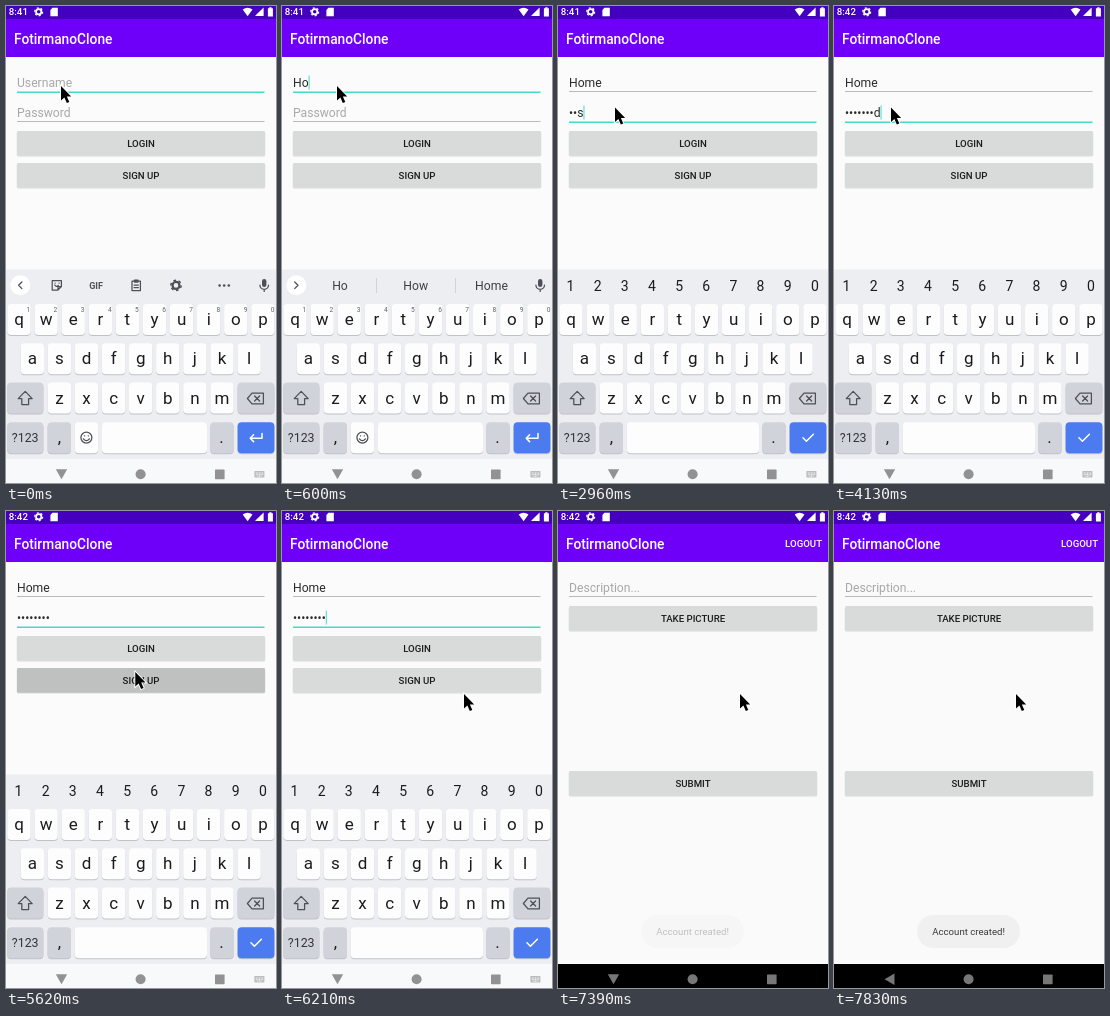
Animation, 270 px wide and 477 px high, one loop 8000 ms. Source, as an HTML page:

```html
<!DOCTYPE html>
<html lang="en">
<head>
<meta charset="utf-8">
<title>Sign up</title>
<style>
  html, body { margin: 0; width: 100%; height: 100%; overflow: hidden; background: #fbfbfb; }
  svg { display: block; width: 270px; height: 477px; font-family: Roboto, sans-serif; }
  .mid { text-anchor: middle; }
  .bold { font-weight: 500; }
  .line { fill: none; stroke: #4d5056; stroke-width: 1.25; stroke-linejoin: round; stroke-linecap: round; }
</style>
</head>
<body>
<svg id="stage" viewBox="0 0 270 477"></svg>
<script>
const LOOP = 8000;
const TEAL = '#45dac8', BAR = '#6e00f9', KEY = '#fdfdfe', GREY = '#d1d3da', INK = '#1a1b1d';
const FIELD = 12.15;

const rect = (x, y, w, h, fill, r = 0, more = '') =>
  `<rect x="${x}" y="${y}" width="${w}" height="${h}" rx="${r}" fill="${fill}" ${more}/>`;
const text = (x, y, size, fill, str, cls = '', more = '') =>
  `<text x="${x}" y="${y}" font-size="${size}" fill="${fill}" class="${cls}" ${more}>${str}</text>`;
const path = (d, more = 'class="line"') => `<path d="${d}" ${more}/>`;
const disc = (x, y, r, fill, more = '') => `<circle cx="${x}" cy="${y}" r="${r}" fill="${fill}" ${more}/>`;
const group = (id, body) => `<g id="${id}">${body}</g>`;

const gear = (x, y, r, color) =>
  disc(x, y, r * .58, 'none', `stroke="${color}" stroke-width="${r * .38}"`) +
  disc(x, y, r * .86, 'none', `stroke="${color}" stroke-width="${r * .26}" pathLength="12" stroke-dasharray="1 1"`);

const button = (y, label, id = '') =>
  rect(10.6, y + .7, 248.8, 25.1, '#000', 1.8, 'opacity=".09"') +
  rect(11, y, 248, 24.8, '#d9dada', 1.4) +
  (id ? rect(11, y, 248, 24.8, '#bfc0c0', 1.4, `id="${id}" opacity="0"`) : '') +
  text(135, y + 16, 9.63, INK, label, 'mid bold');

const underline = (id, y) => `<line id="${id}" x1="11" x2="258.5" y1="${y}" y2="${y}" stroke="#aaa" stroke-width=".8"/>`;
const hint = (id, y, str) => text(11, y, FIELD, '#a8a8a8', str, '', `id="${id}"`);
const appBar = rect(0, 13, 270, 38, BAR) + text(8, 37.7, 13.75, '#fff', 'FotirmanoClone', 'bold');

function statusBar() {
  const w = 'fill="#fff"';
  return rect(0, 0, 270, 13, '#4500bf') +
    text(2.8, 9.4, 9.7, '#fff', '8:41', 'bold', 'id="clock"') +
    gear(32.7, 5.8, 4.6, '#fff') +
    path('M46.4 1.8h5.4v8.4h-7.4v-6.2z', w) +
    path('M241.6 10.2L236.7 3.6Q241.6 -.2 246.5 3.6Z', w) +
    path('M249.4 10V9.6L257.6 1.6V10Z', w) +
    path('M261.9 2.2h1.4v-1h2.2v1h1.4v8.2h-5z', w);
}

function login() {
  return appBar + hint('userHint', 81, 'Username') + text(11, 81, FIELD, '#2b2b2b', '', '', 'id="user"') +
    hint('passHint', 111, 'Password') + text(11, 111, FIELD, '#2b2b2b', '', '', 'id="pass"') +
    underline('userLine', 85.5) + underline('passLine', 115.5) +
    button(125, 'LOGIN') + button(157, 'SIGN UP', 'press') +
    rect(0, 0, 1, 14, TEAL, 0, 'id="caret"');
}

function home() {
  return rect(0, 13, 270, 440, '#fafafa') + appBar +
    text(264, 36.2, 9.63, '#fff', 'LOGOUT', 'bold', 'text-anchor="end"') +
    hint('about', 81, 'Description...') + underline('aboutLine', 85.5) +
    button(95, 'TAKE PICTURE') + button(260, 'SUBMIT');
}

const key = (x, y, w, fill = KEY) =>
  rect(x, y + 1, w, 31, '#bfc2ca', 4) + rect(x, y, w, 31, fill, 4);

function letters() {
  const rows = [['qwertyuiop', 13, 298], ['asdfghjkl', 26.3, 337.2], ['zxcvbnm', 53.4, 376.6]];
  return rows.map(([row, x0, y]) => [...row].map((c, i) => {
    const x = x0 + 27.1 * i;
    return key(x - 11.7, y, 23.4) + text(x, y + 21, 17, INK, c, 'mid letter');
  }).join('')).join('');
}

const digits = (dx, y, size, fill) => [...'1234567890'].map((d, i) =>
  text(12.5 + dx + 27.15 * i, y, size, fill, d, 'mid')).join('');

const mic = rect(256, 273, 4.4, 8, '#4d5056', 2.2) + path('M253.9 279a4.3 4.3 0 0 0 8.6 0M258.2 283.4v2');
const chevron = dir => disc(14.3, 279.3, 10, '#fff') + path(`M${14.3 - 1.6 * dir} 276l${3.3 * dir} 3.3l${-3.3 * dir} 3.3`);

function keyboard() {
  const tools = chevron(-1) +
    path('M46.2 274.5h9.2v6l-3.5 3.5h-5.7zM52 284v-3.5h3.5M48.8 279q1.6 2.5 3.5 .5M49 277h.2M53 277h.2') +
    text(90, 282.7, 9, '#4d5056', 'GIF', 'mid', 'font-weight="700"') +
    path('M126 275h8.4v9.6h-8.4zM128.4 274h3.6v2h-3.6zM128 279h4.4M128 281.6h4.4') +
    gear(170, 279.4, 6, '#4d5056') +
    [213.6, 218.2, 222.8].map(x => disc(x, 279.5, 1.3, '#4d5056')).join('') + mic;
  const words = chevron(1) + rect(94, 272, .7, 15, '#c6c8ce') + rect(173.2, 272, .7, 15, '#c6c8ce') +
    [58, 133.7, 209.5].map(x => text(x, 284, 12.2, '#3c4043', '', 'mid word')).join('') + mic;
  const white = 'class="line" style="stroke:#fff;stroke-width:1.5"';
  const plain = key(96, 416.2, 105) + key(68.7, 416.2, 23.4) +
    disc(80.4, 431.6, 5.5, 'none', 'class="line"') + path('M77.4 432.8q3 3.8 6 0M78.4 429.8h.2M82.2 429.8h.2') +
    path('M256 427.6v4.6h-11.8m3.4 -3.4l-3.4 3.4l3.4 3.4', white) + digits(9.8, 306.2, 6.6, '#5f6368');
  const secret = key(68.7, 416.2, 132.3) + path('M245 431.8l3.4 3.4l7 -7', white) + digits(0, 284.8, 14, INK);
  return rect(0, 263.5, 270, 189.5, '#eceef2') + rect(0, 453, 270, 24, '#f8f9fa') +
    group('tools', tools) + group('words', words) + letters() +
    key(1.2, 376.6, 36.2, GREY) + path('M19.2 385.4l7 7.2h-3.6v6h-6.8v-6h-3.6z', 'class="line" id="shift"') +
    key(231.6, 376.6, 36.8, GREY) + path('M246 387.2h11.4v10.6h-11.4l-4.6 -5.3zM248.6 390l5 5m0 -5l-5 5') +
    key(1.2, 416.2, 36.2, GREY) + text(19.2, 436.2, 12.4, '#303338', '?123', 'mid') +
    key(41.6, 416.2, 23.4, GREY) + text(53.5, 437.4, 17, INK, ',', 'mid') +
    key(204.3, 416.2, 23.4, GREY) + text(215.6, 437.4, 17, INK, '.', 'mid') +
    key(231.6, 416.2, 36.8, '#4b7bee') +
    group('plain', plain) + group('secret', secret);
}

const nav = () => group('nav',
  path('M49.8 463.2h11.4l-5.7 10z', 'id="back"') + disc(134.6, 468.2, 5, 'inherit') +
  rect(209, 463.6, 9.6, 9.6, 'inherit', .6) +
  group('imeIcon', rect(248.4, 465, 10, 6.4, 'inherit', .6, 'opacity=".6"') +
    path('M249.8 467h7.4M249.8 468.7h7.4M251.4 470.2h4', 'id="imeKeys" stroke-dasharray="1 .6"')));

const toast = rect(83, 404, 103, 33, '#f0f0f0', 16.5) + text(134.6, 424, 9.63, '#3a3a3a', 'Account created!', 'mid');
const arrow = path('M0 0V14.6L3.4 11.5L5.8 17L8.3 15.9L5.9 10.6H10.2Z',
  'fill="#000" stroke="#fff" stroke-width="1.8" paint-order="stroke"');

document.getElementById('stage').innerHTML =
  rect(0, 0, 270, 477, '#fbfbfb') + group('login', login()) + group('home', home()) + statusBar() +
  rect(0, 453, 270, 24, '#000') + group('keyboard', keyboard()) + nav() +
  group('toast', toast) + group('pointer', arrow);

const $ = id => document.getElementById(id);
const all = sel => [...document.querySelectorAll(sel)];
const set = (el, attrs) => { for (const k in attrs) el.setAttribute(k, attrs[k]); };
const show = (id, on) => set($(id), { visibility: on ? 'inherit' : 'hidden' });

// Each row: start time, then the values held until the next row.
const steps = {
  user: [[0, 0], [450, 1], [590, 2], [740, 3], [1040, 4]],
  pass: [[0, 0], [2520, 1], [2670, 2], [2960, 3], [3250, 4], [3550, 5], [3700, 6], [3840, 7], [4130, 8], [5480, 9]],
  caret: [[0, 0], [450, 1], [1480, 0], [1780, 1], [2070, 0], [2520, 1], [4580, 0], [5030, 1], [5480, 0], [6060, 1]],
  press: [[0, 0], [5330, .4], [5480, .75], [5620, 1], [5910, .6], [6060, .25], [6210, 0]],
  pointer: [[0, 55, 80], [1180, 53, 88], [1330, 51, 94], [1480, 53, 98], [1630, 57, 101.5],
    [4580, 64, 107], [4730, 92, 128], [4880, 120, 152], [5030, 129.3, 161],
    [5910, 142, 167], [6060, 170, 178], [6210, 182, 183]],
  home: [[0, 0, 40], [6950, .25, 24], [7100, .65, 10], [7250, .92, 3], [7390, 1, 0]],
  toast: [[0, 0], [7390, .3], [7540, .7], [7680, 1]],
  back: [[0, 0], [7540, 30], [7680, 65], [7830, 90]]
};
const at = (track, t) => steps[track].findLast(row => row[0] <= t).slice(1);

const guesses = [['', '', ''], ['H', 'Have', 'How'], ['Ho', 'How', 'Home'], ['Hom', 'Home', 'Homes'], ['Home', 'Homes', 'Homed']];

function masked(n) {
  if (n > 8) return '•'.repeat(8);
  return n ? '•'.repeat(n - 1) + 'password'[n - 1] : '';
}

function focusLine(id, y, on) {
  const pos = on ? y + .75 : y;
  set($(id), { y1: pos, y2: pos, stroke: on ? TEAL : '#aaa', 'stroke-width': on ? 1.3 : .8 });
}

function render(t) {
  const [typed] = at('user', t), [count] = at('pass', t);
  const onPass = t >= 1780, secret = t >= 1920, upper = t >= 300 && t < 450, ime = t < 6660;

  $('user').textContent = 'Home'.slice(0, typed);
  $('pass').textContent = masked(count);
  show('userHint', !typed);
  show('passHint', !count);
  focusLine('userLine', 85.5, !onPass);
  focusLine('passLine', 115.5, onPass);

  const field = $(onPass ? 'pass' : 'user');
  const end = field.textContent ? field.getComputedTextLength() : 0;
  set($('caret'), { x: 11 + end, y: onPass ? 99.5 : 69.5 });
  show('caret', at('caret', t)[0]);
  set($('press'), { opacity: at('press', t)[0] });
  $('clock').textContent = t < 3110 ? '8:41' : '8:42';

  show('keyboard', ime);
  show('tools', !typed);
  show('words', typed && !secret);
  show('plain', !secret);
  show('secret', secret);
  all('.word').forEach((el, i) => el.textContent = guesses[typed][i]);
  all('.letter').forEach(el => el.textContent = upper ? el.textContent.toUpperCase() : el.textContent.toLowerCase());
  $('shift').style.fill = upper ? INK : 'none';

  set($('nav'), { fill: ime ? '#929294' : '#777' });
  set($('imeKeys'), { stroke: ime ? '#f8f9fa' : '#000' });
  show('imeIcon', t < 6810);
  set($('back'), { transform: `rotate(${at('back', t)[0]} 55.5 468.2)` });

  const [fade, drop] = at('home', t);
  set($('home'), { opacity: fade, transform: `translate(0 ${drop})` });
  set($('toast'), { opacity: at('toast', t)[0] });
  set($('pointer'), { transform: `translate(${at('pointer', t)})` });
}

const start = performance.now();
function tick() {
  render((performance.now() - start) % LOOP);
  requestAnimationFrame(tick);
}
tick();
</script>
</body>
</html>
```
